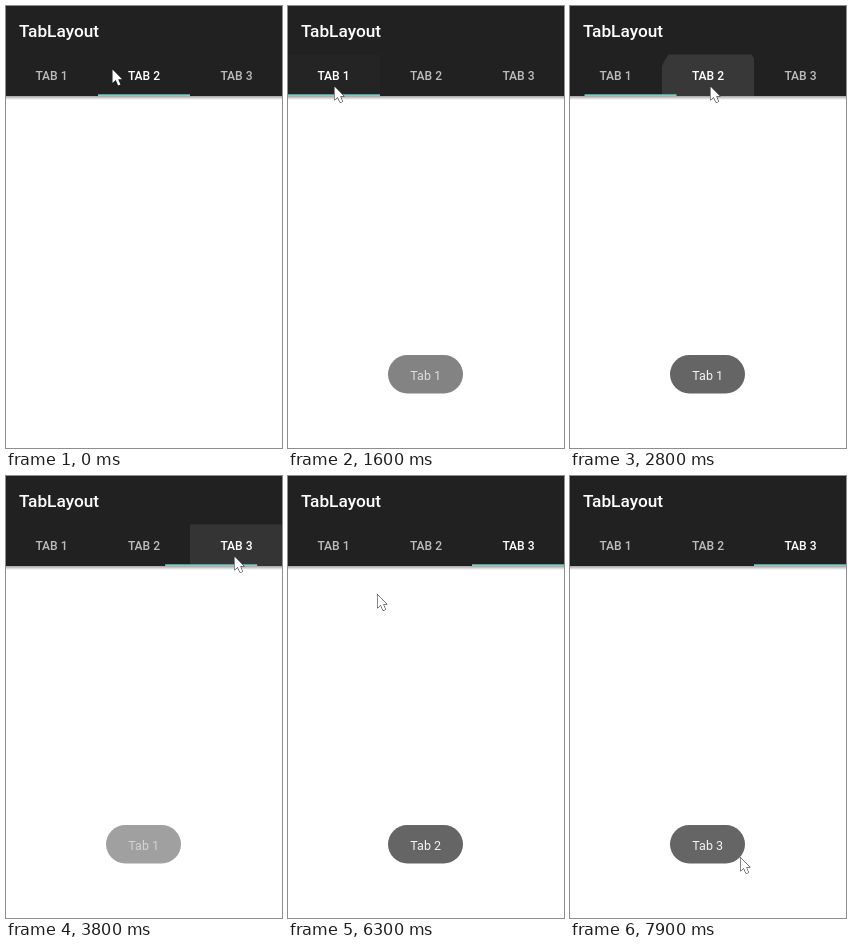
Recreate the animation shown at these times as an HTML page with a canvas. Size 276x442 px, loop 8000 ms.

```html
<!DOCTYPE html>
<html>
<head>
<meta charset="utf-8">
<style>
  html, body { margin: 0; width: 100%; height: 100%; overflow: hidden; background: #fff; }
  canvas { display: block; }
</style>
</head>
<body>
<canvas id="stage" width="276" height="442"></canvas>
<script>
const ctx = document.getElementById('stage').getContext('2d');
const LOOP = 8000, STEP = 100, TAB = 92, BAR_TOP = 48.5, BAR_BOTTOM = 90;

const clamp = v => Math.max(0, Math.min(1, v));
const progress = (t, start, length) => clamp((t - start) / length);
const smooth = p => (1 - Math.cos(Math.PI * p)) / 2;

// Material "fast out, slow in": cubic-bezier(.4, 0, .2, 1)
function fastOutSlowIn(p) {
  let lo = 0, hi = 1;
  for (let i = 0; i < 20; i++) {
    const s = (lo + hi) / 2, r = 1 - s;
    if (1.2 * s * r * r + 0.6 * s * s * r + s ** 3 < p) lo = s; else hi = s;
  }
  return lo * lo * (3 - 2 * lo);
}

// Each press starts a ripple; the tab is selected on release.
const presses = [
  { tab: 0, down: 950, select: 1125, x: 46 },
  { tab: 1, down: 2540, select: 2704, x: 140 },
  { tab: 2, down: 3440, select: 3590, x: 228 },
];
const toasts = [
  { label: 'Tab 1', show: 1070, hide: 3480 },
  { label: 'Tab 2', show: 3880, hide: 7130 },
  { label: 'Tab 3', show: 7170, hide: LOOP + 1000 },
];
// time, x, y
const cursorPath = [
  [0, 106, 63], [200, 106, 63], [600, 46, 80], [1800, 46, 80],
  [2400, 140, 80], [2900, 140, 80], [3400, 228, 80], [4100, 228, 80],
  [4500, 79, 86], [5000, 62, 96], [5700, 62, 96], [6000, 89, 118],
  [6300, 89, 118], [7100, 140, 345], [7500, 160, 405], [7900, 170, 381],
];

function text(str, x, y, font, color, align = 'center') {
  ctx.font = `${font} Roboto, sans-serif`;
  ctx.fillStyle = color;
  ctx.textAlign = align;
  ctx.fillText(str, x, y);
}

function drawRipple({ tab, down, select, x }, t) {
  const strength = 0.1 * progress(t, down, 150) * (1 - smooth(progress(t, select + 100, 480)));
  if (!strength) return;
  ctx.save();
  ctx.beginPath();
  ctx.rect(tab * TAB, BAR_TOP, TAB, BAR_BOTTOM - BAR_TOP);
  ctx.clip();
  ctx.beginPath();
  ctx.arc(x, 80, 200 * (t - down) / 1000, 0, 7);
  ctx.fillStyle = `rgba(255,255,255,${strength})`;
  ctx.fill();
  ctx.restore();
}

function drawBar(t) {
  const shadow = ctx.createLinearGradient(0, BAR_BOTTOM, 0, BAR_BOTTOM + 4);
  shadow.addColorStop(0, 'rgba(0,0,0,.36)');
  shadow.addColorStop(1, 'rgba(0,0,0,0)');
  ctx.fillStyle = shadow;
  ctx.fillRect(0, BAR_BOTTOM, 276, 4);
  ctx.fillStyle = '#212121';
  ctx.fillRect(0, 0, 276, BAR_BOTTOM);

  let selected = 1, left = TAB;
  for (const press of presses) {
    drawRipple(press, t);
    if (t < press.select) continue;
    selected = press.tab;
    left += (press.tab * TAB - left) * fastOutSlowIn(progress(t, press.select, 450));
  }
  ctx.fillStyle = '#80cbc4';
  ctx.fillRect(left, BAR_BOTTOM - 1.7, TAB, 1.7);

  text('TabLayout', 13, 31, '500 17.25px', '#fff', 'left');
  for (let i = 0; i < 3; i++)
    text(`TAB ${i + 1}`, 45.5 + i * 92.5, 74, '500 12.07px', i === selected ? '#fff' : '#bcbcbc');
}

function drawToast({ label, show, hide }, t) {
  ctx.globalAlpha = smooth(progress(t, show, 750)) * (1 - smooth(progress(t, hide, 750)));
  ctx.fillStyle = '#656565';
  ctx.beginPath();
  ctx.roundRect(100, 349, 75, 38.5, 19.25);
  ctx.fill();
  text(label, 137.7, 374, '400 12.5px', '#f4f4f4');
  ctx.globalAlpha = 1;
}

function drawCursor(t) {
  let i = cursorPath.findIndex(p => p[0] > t);
  if (i < 0) i = cursorPath.length - 1;
  const [t0, x0, y0] = cursorPath[i - 1], [t1, x1, y1] = cursorPath[i];
  const p = progress(t, t0, t1 - t0);
  ctx.save();
  ctx.translate(x0 + (x1 - x0) * p + 0.5, y0 + (y1 - y0) * p + 0.5);
  ctx.fillStyle = '#fff';
  ctx.strokeStyle = '#111';
  ctx.stroke(arrow);
  ctx.fill(arrow);
  ctx.restore();
}
const arrow = new Path2D('M0 0V13.5L3.2 10.6L5.6 16L8 15L5.7 9.7H9.6Z');

function frame(now) {
  const t = Math.floor(now % LOOP / STEP) * STEP;
  ctx.fillStyle = '#fff';
  ctx.fillRect(0, 0, 276, 442);
  drawBar(t);
  toasts.forEach(toast => drawToast(toast, t));
  drawCursor(t);
  requestAnimationFrame(frame);
}
requestAnimationFrame(frame);
</script>
</body>
</html>
```
